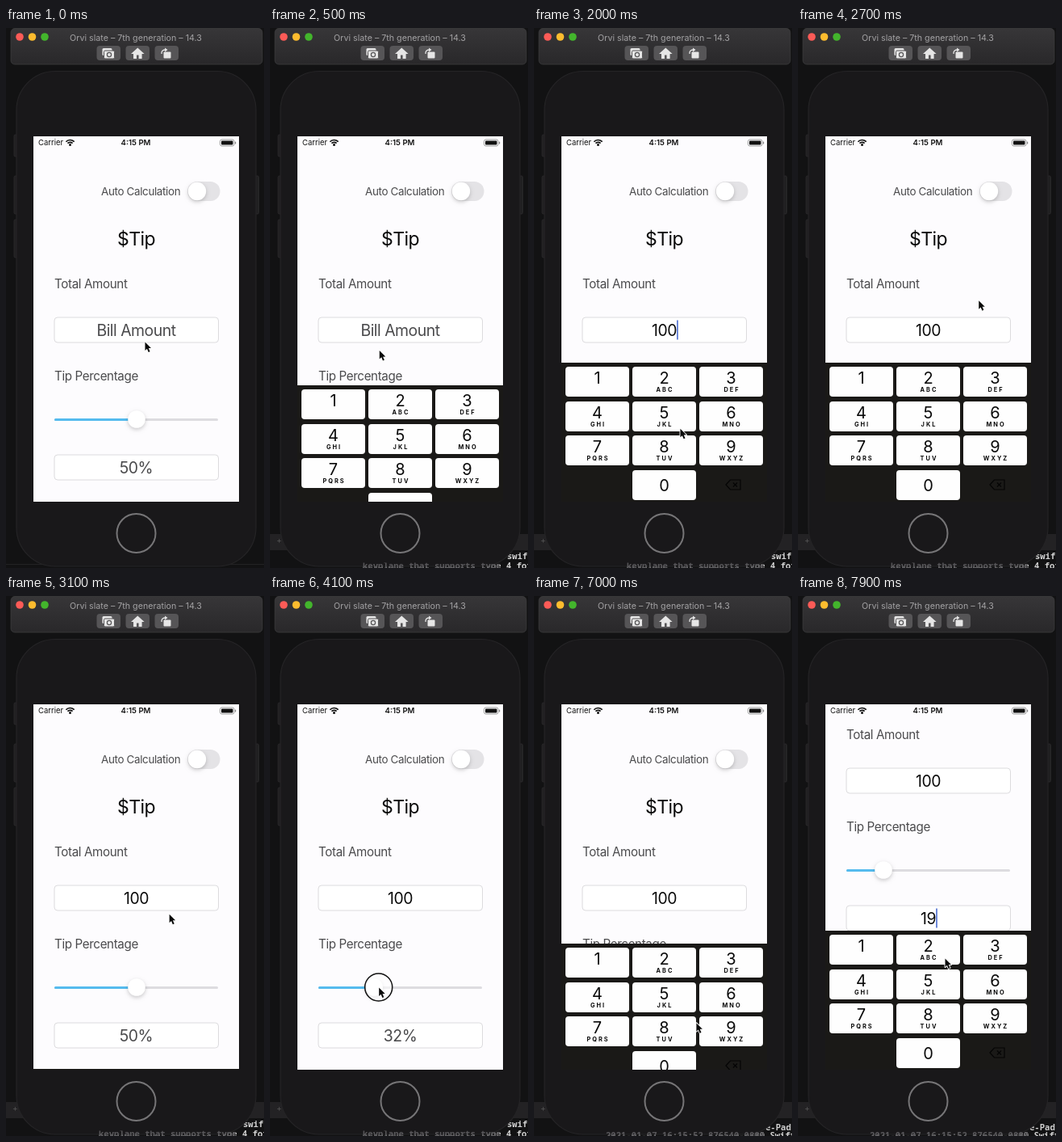
Animation of 320x668 px, one loop 8 s. Source, as an HTML page with a canvas:

```html
<!DOCTYPE html>
<html lang="en">
<head>
<meta charset="utf-8">
<title>Tip calculator</title>
<style>
html, body { margin: 0; width: 320px; height: 668px; overflow: hidden; background: #121213; }
canvas { display: block; width: 320px; height: 668px; }
</style>
</head>
<body>
<canvas></canvas>
<script>
const canvas = document.querySelector('canvas');
const c = canvas.getContext('2d');
const ratio = window.devicePixelRatio || 1;
canvas.width = 320 * ratio;
canvas.height = 668 * ratio;

const LOOP = 8000, REST = 100, KEY_FADE = 250;
const LOG_START = 300, PERCENT_FOCUS = 6700;
const SANS = 'Inter, sans-serif';
const MONO = '"Noto Sans Mono", "DejaVu Sans Mono", monospace';
const GREY = '#4a4a4c', INK = '#0a0a0a';
const KEYS = ['1', '2ABC', '3DEF', '4GHI', '5JKL', '6MNO', '7PQRS', '8TUV', '9WXYZ', '', '0'];

// The pointer glides from tap to tap; key taps also type, the drag moves the slider
const tap = (at, x, y, extra) => ({ at, x, y, hold: 90, dx: 0, ...extra });
const DRAG = tap(3800, 167.5, 484, { hold: 540, dx: -56 });
const TAPS = [
  tap(-90, 172, 388), tap(200, 168, 374),
  tap(900, 80, 440, { key: '1' }),
  tap(1370, 160, 573, { key: '0' }), tap(1620, 160, 573, { key: '0' }),
  tap(2570, 224, 336), DRAG, tap(5700, 206, 567), tap(6580, 205, 545), tap(LOOP, 182, 448)
];

const clamp = v => Math.min(1, Math.max(0, v));
const smooth = u => u * u * (3 - 2 * u);
const easeOut = (t, start, length) => 1 - (1 - clamp((t - start) / length)) ** 3;
const lasts = (t, start, length) => t >= start && t < start + length;
const dragged = t => smooth(clamp((t - DRAG.at) / DRAG.hold));
const blink = time => time % 1000 < 500;

function box(x, y, w, h, r, fill, stroke, width = 1) {
  c.beginPath();
  c.roundRect(x, y, w, h, r);
  if (fill) { c.fillStyle = fill; c.fill(); }
  if (stroke) { c.strokeStyle = stroke; c.lineWidth = width; c.stroke(); }
}

function disc(x, y, r, fill, stroke, width) {
  box(x - r, y - r, 2 * r, 2 * r, r, fill, stroke, width);
}

function knob(x, y, r) {
  c.save();
  c.shadowColor = 'rgba(0,0,0,.2)';
  c.shadowBlur = 5 * ratio;
  c.shadowOffsetY = 2 * ratio;
  disc(x, y, r, '#fff');
  c.restore();
}

// y is the middle of the capitals
function text(str, x, y, size, color, { align = 'left', weight = 400, family = SANS, spacing = 0 } = {}) {
  c.font = `${weight} ${size}px ${family}`;
  c.letterSpacing = spacing + 'px';
  c.textAlign = align;
  c.fillStyle = color;
  c.fillText(str, x, y + size * 0.364);
}

const label = (str, x, y, size, color, align) =>
  text(str, x, y, size, color, { align, spacing: -0.025 * size });

function polygon(points, fill, stroke, width = 1) {
  c.beginPath();
  points.forEach(([x, y]) => c.lineTo(x, y));
  c.closePath();
  if (stroke) { c.strokeStyle = stroke; c.lineWidth = width; c.stroke(); }
  if (fill) { c.fillStyle = fill; c.fill(); }
}

function titleBar() {
  const shade = c.createLinearGradient(0, 0, 0, 45);
  shade.addColorStop(0, '#373638');
  shade.addColorStop(1, '#29282a');
  box(6, 0.5, 312, 44.5, 5, shade, '#403f41', 0.7);
  ['#fc5b57', '#fdbc2e', '#43b52c'].forEach((color, i) => disc(17 + i * 15.5, 11, 4.8, color));
  text('Orvi slate – 7th generation – 14.3', 161, 12, 10.7, '#a3a2a4', { align: 'center' });

  const ink = '#e6e6e6', gap = '#565557';
  for (let i = 0; i < 3; i++) box(112.5 + 36 * i, 22, 29.5, 18, 4, gap);
  box(119.5, 25, 12, 9, 1.5, ink);
  box(121.5, 28, 13, 10, 1.5, ink, gap);
  disc(128, 33, 2.6, null, gap, 1.2);
  polygon([[155, 32], [163.3, 24.5], [171.6, 32]], ink);
  box(158, 31, 10.6, 7, 0.5, ink);
  box(162, 33.5, 2.6, 4.5, 0, gap);
  box(195.5, 29.5, 9, 8, 1, ink);
  c.beginPath();
  c.moveTo(193, 32);
  c.quadraticCurveTo(192.5, 27, 198, 27);
  c.strokeStyle = ink;
  c.lineWidth = 1.3;
  c.stroke();
  polygon([[197, 24.5], [200.5, 27], [197, 29.5]], ink);
}

function logLines(t, color) {
  const line = (str, x, y) => text(str, x, y, 10.6, color, { weight: 700, family: MONO });
  if (t >= PERCENT_FOCUS) {
    line('e-Pad', 287, 657);
    line('2021-01-07 16:15:52.876540-0800 Swift', 89, 667);
  } else {
    line('swift', 294, 653);
    line('keyplane that supports type 4 for', 115, 665);
  }
}

function backdrop(t) {
  c.fillStyle = '#121213';
  c.fillRect(0, 0, 320, 668);
  c.fillStyle = '#232224';
  if (t < LOG_START) {
    c.fillRect(0, 663, 320, 1);
  } else {
    c.fillRect(0, 626, 320, 20);
    text('+', 8, 633, 10, '#555');
    logLines(t, '#cfcfcf');
  }
}

function device(t) {
  const button = (x, y, h) => box(x, y, 5, h, 1.5, '#202021', '#2e2d2f', 0.8);
  button(10, 132, 27);
  button(10, 183, 47);
  button(10, 237, 47);
  button(308.5, 183, 47);
  box(13, 53.5, 297, 612.5, 48, '#19181a', '#252426', 1.2);
  disc(161.5, 625, 24, null, '#767577', 2);
  if (t < LOG_START) return;
  // The log shows faintly through the device's lower rim
  c.save();
  c.beginPath();
  c.rect(50, 661.5, 235, 7);
  c.clip();
  logLines(t, '#58575a');
  c.restore();
}

function statusBar() {
  text('Carrier', 40, 142, 9.5, '#111');
  text('4:15 PM', 161, 142, 9.6, '#111', { align: 'center', weight: 600 });
  c.strokeStyle = '#111';
  c.lineWidth = 1.7;
  [4.2, 7].forEach(r => {
    c.beginPath();
    c.arc(79.5, 145.5, r, -Math.PI * 0.76, -Math.PI * 0.24);
    c.stroke();
  });
  disc(79.5, 144.6, 1.5, '#111');
  box(265.5, 138, 17.5, 8, 2.2, null, '#888', 0.8);
  box(267, 139.5, 14.5, 5, 1, '#111');
  box(284, 140.5, 1.2, 3, 0.6, '#888');
}

function field(y, str, color, caret) {
  box(60, y, 203.5, 31, 4, '#fff', '#dcdbde');
  label(str, 161.5, y + 16, 19.4, color, 'center');
  if (!caret) return;
  c.fillStyle = '#4a6cd0';
  c.fillRect(161.7 + c.measureText(str).width / 2, y + 3.5, 1.6, 24);
}

function form(t) {
  const strokes = TAPS.filter(p => p.key && t >= p.at + REST);
  const typed = strokes.map(p => p.key).join('');
  const typing = typed && t < 2690 && blink(t - strokes.at(-1).at - REST);
  const editing = t >= PERCENT_FOCUS;
  const thumb = 162 + DRAG.dx * dragged(t);

  label('Auto Calculation', 118, 202, 13.4, GREY);
  box(225, 190, 40.5, 24, 12, '#e4e3e6');
  knob(237, 202, 11.2);
  label('$Tip', 161.5, 261, 23, INK, 'center');
  label('Total Amount', 60, 316.5, 15.2, GREY);
  field(358, typed || 'Bill Amount', typed ? INK : GREY, typing);
  label('Tip Percentage', 60, 430.5, 15.2, GREY);
  box(60, 483, 203, 3, 1.5, '#dddce0');
  box(60, 483, thumb - 60, 3, 1.5, '#55bbee');
  knob(thumb, 484, 10.8);
  field(528, Math.round(50 - 31 * dragged(t)) + (editing ? '' : '%'), editing ? INK : GREY,
    editing && blink(t - PERCENT_FOCUS));
}

function keyboard(t, top) {
  if (top >= 586) return;
  c.save();
  c.translate(0, Math.round(top));
  c.fillStyle = '#1a1917';
  c.fillRect(34, 0, 255, 180);
  KEYS.forEach((key, i) => {
    if (!key) return;
    const x = 39 + (i % 3) * 83, y = Math.round(5 + Math.floor(i / 3) * 42.6);
    const down = TAPS.some(p => p.key === key && lasts(t, p.at, KEY_FADE));
    box(x, y, 79, 37, 4, down ? '#32312f' : '#fefefe');
    text(key[0], x + 39.5, y + (key === '0' ? 18.5 : 13.5), 20, INK, { align: 'center' });
    text(key.slice(1), x + 40.5, y + 28.7, 7.4, INK, { align: 'center', weight: 700, spacing: 2 });
  });
  polygon([[238, 151], [243.5, 145], [256, 145], [256, 157], [243.5, 157]], null, '#050505', 1.2);
  polygon([[247, 148.5], [252, 153.5]], null, '#050505', 1.2);
  polygon([[252, 148.5], [247, 153.5]], null, '#050505', 1.2);
  c.restore();
}

function pointerAt(t) {
  const i = TAPS.findIndex(p => t < p.at + p.hold);
  const from = TAPS[i - 1], to = TAPS[i];
  const leave = from.at + from.hold, x0 = from.x + from.dx;
  const u = smooth(clamp((t - leave) / (to.at - REST - leave)));
  return [x0 + (to.x - x0) * u + (to === DRAG ? DRAG.dx * dragged(t) : 0), from.y + (to.y - from.y) * u];
}

function pointer(t) {
  const [x, y] = pointerAt(t);
  if (TAPS.some(p => lasts(t, p.at, p.hold))) disc(x, y, 17, 'rgba(255,255,255,.6)', '#111', 1.5);
  c.save();
  c.translate(x, y);
  c.lineJoin = 'round';
  polygon([[0.5, 0.5], [0.5, 11], [2.9, 8.8], [4.7, 13], [6.6, 12.2], [4.8, 8.1], [8, 8]], INK, '#fff', 1.8);
  c.restore();
}

function draw(now) {
  const t = now % LOOP;
  c.setTransform(ratio, 0, 0, ratio, 0, 0);
  backdrop(t);
  titleBar();
  device(t);

  c.save();
  c.beginPath();
  c.rect(34, 134, 255, 452);
  c.clip();
  c.fillStyle = '#fdfcfe';
  c.fillRect(34, 134, 255, 452);
  c.save();
  c.translate(0, -145 * easeOut(t, 7030, 450));
  form(t);
  c.restore();
  statusBar();
  const shown = easeOut(t, 250, 550) - easeOut(t, 2740, 450) + easeOut(t, PERCENT_FOCUS, 550);
  keyboard(t, 586 - 172 * shown);
  c.restore();

  pointer(t);
  requestAnimationFrame(draw);
}
requestAnimationFrame(draw);
</script>
</body>
</html>
```
